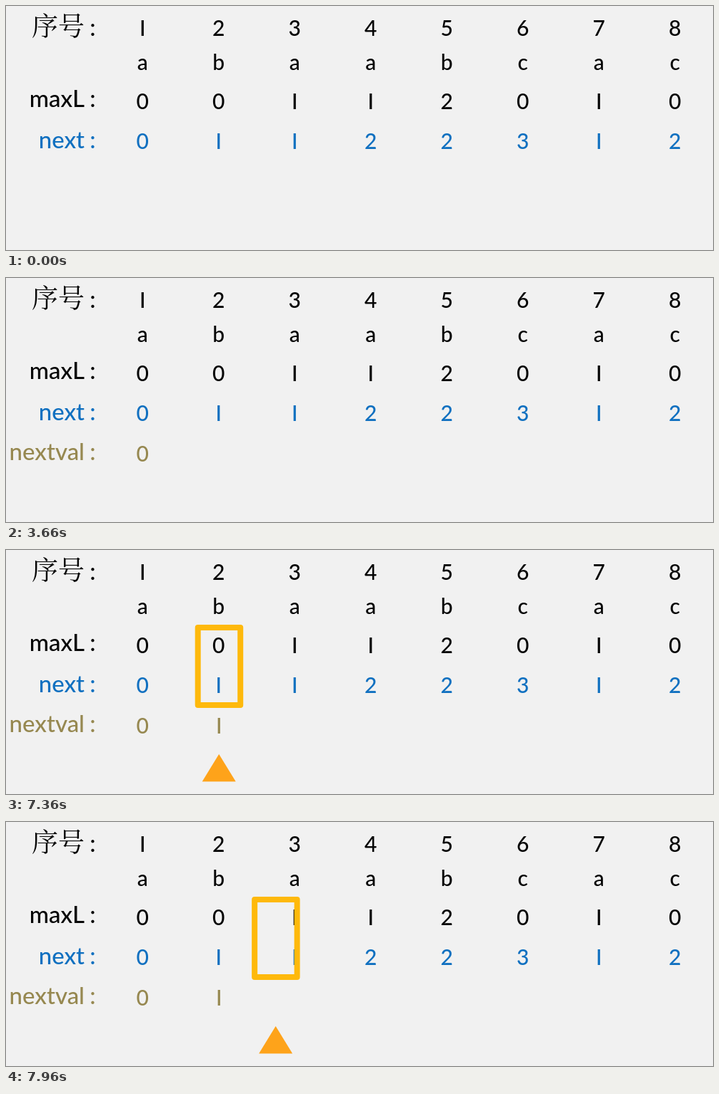
Animation, 990 px wide and 343 px high, one loop 7990 ms. Source, as an HTML page with a canvas:

```html
<!DOCTYPE html>
<html lang="zh">
<head>
<meta charset="utf-8">
<title>nextval</title>
<style>
html, body { margin: 0; width: 100%; height: 100%; overflow: hidden; background: #f1f1f1; }
canvas { display: block; width: 990px; height: 343px; }
</style>
</head>
<body>
<canvas id="stage" width="990" height="343"></canvas>
<script>
const ctx = document.getElementById('stage').getContext('2d');
const LOOP = 7990;
const BLACK = '#050505', BLUE = '#1070c0', OLIVE = '#968850';
const LATIN = 'Lato, "Open Sans", sans-serif';
const HAN = '"Noto Serif CJK SC", "Noto Sans CJK SC", "Noto Sans CJK", serif';

const colX = i => 191.2 + 106.5 * i;
const fade = (t, start, span = 350) => Math.min(1, Math.max(0, (t - start) / span));

function text(str, x, y, size, color, align = 'center', family = LATIN) {
  ctx.font = `500 ${size}px ${family}`;
  ctx.textAlign = align;
  ctx.fillStyle = color;
  ctx.fillText(str, x, y);
}

// A capital I gives the plain upright stroke of the numeral one.
function cells(str, y, color, size = 30) {
  [...str].forEach((ch, i) => text(ch === '1' ? 'I' : ch, colX(i), y, size, color));
}

function label(str, y, color, size = 33, family = LATIN) {
  text(str, 110, y, size, color, 'right', family);
  text(':', 121.5, y, 33, color);
}

function withAlpha(alpha, draw) {
  if (alpha <= 0) return;
  ctx.globalAlpha = alpha;
  draw();
  ctx.globalAlpha = 1;
}

// Quick start, then a gentle slowdown.
function slide(t) {
  const d = Math.max(0, t - 7345), speed = 0.1833, ramp = 100;
  if (d < ramp) return speed * d * d / (2 * ramp);
  const s = d - ramp / 2;
  return speed * s - 7.5e-5 * s * s;
}

function marker(dx) {
  ctx.save();
  ctx.translate(dx, 0);
  ctx.lineWidth = 8;
  ctx.lineJoin = 'round';
  ctx.strokeStyle = '#feb90c';
  ctx.strokeRect(268.5, 109, 59.5, 109);
  ctx.fillStyle = '#fea31a';
  ctx.beginPath();
  ctx.moveTo(298, 287);
  ctx.lineTo(321.5, 325.5);
  ctx.lineTo(274.5, 325.5);
  ctx.fill();
  ctx.restore();
}

function render(t) {
  ctx.fillStyle = '#f1f1f1';
  ctx.fillRect(0, 0, 990, 343);

  label('序号', 42, BLACK, 37, HAN);
  cells('12345678', 42, BLACK);
  cells('abaabcac', 90, BLACK);
  label('maxL', 142, BLACK);
  cells('00112010', 145, BLACK);
  label('next', 200, BLUE);
  cells('01122312', 201, BLUE);

  withAlpha(fade(t, 1130), () => label('nextval', 256, OLIVE));
  withAlpha(fade(t, 2770), () => text('0', colX(0), 258, 30, OLIVE));
  withAlpha(fade(t, 5390), () => text('I', colX(1) + 0.5, 258, 30, OLIVE));
  withAlpha(fade(t, 4540), () => marker(slide(t)));
}

let start;
function tick(now) {
  start ??= now;
  render((now - start) % LOOP);
  requestAnimationFrame(tick);
}
render(0);
requestAnimationFrame(tick);
</script>
</body>
</html>
```
